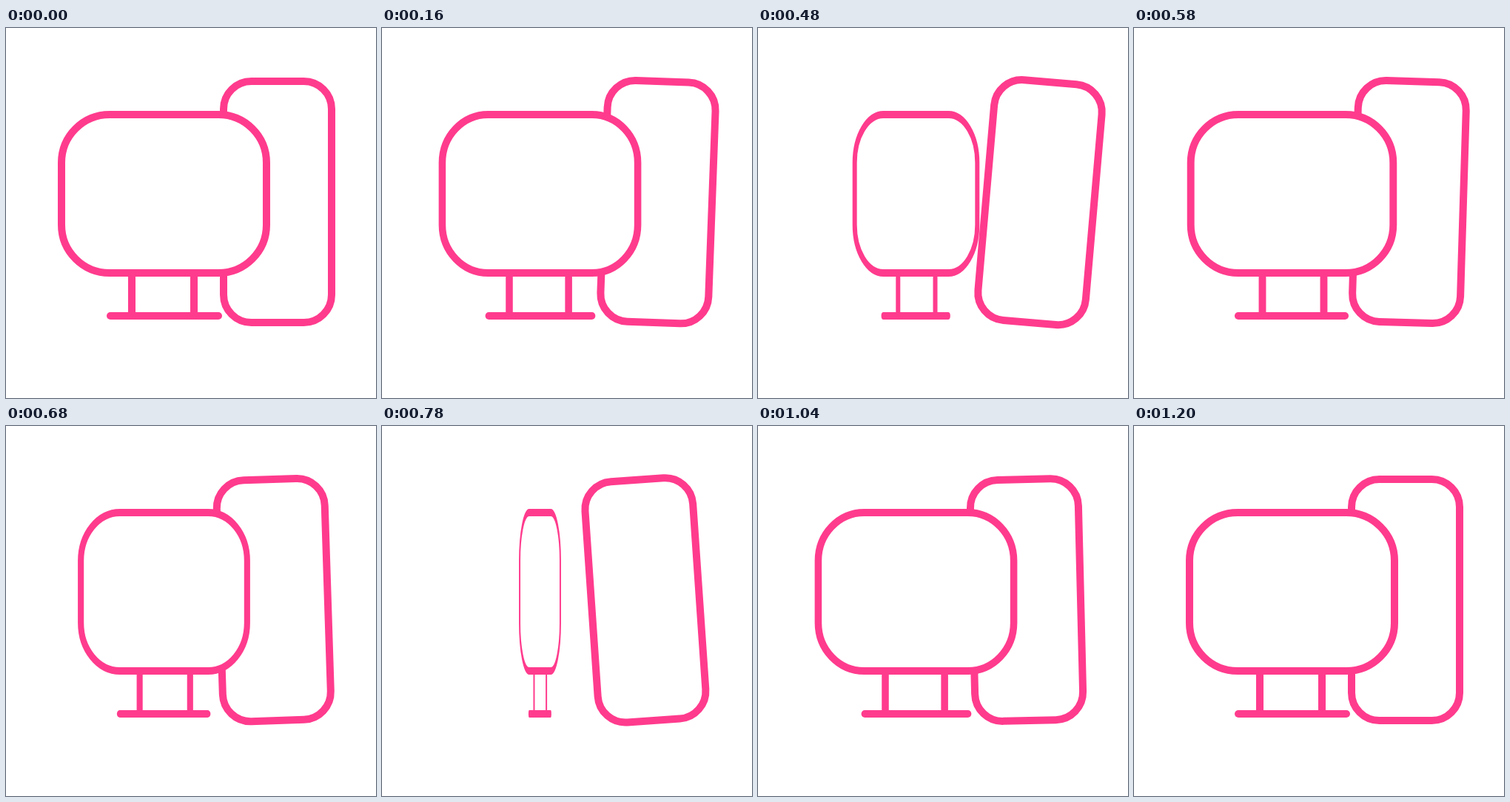
These frames come from a looping animation (500 by 500 pixels, 1500 ms). An HTML page:

```html
<!DOCTYPE html>
<html lang="en">
<head>
<meta charset="utf-8">
<title>Computer</title>
<style>
  html, body { margin: 0; height: 100%; overflow: hidden; background: #fff; }
  svg { display: block; width: 100vw; height: 100vh; }
</style>
</head>
<body>
<svg viewBox="0 0 500 500" fill="#fff" stroke="#ff3b8d" stroke-width="10">
  <rect id="tower" x="294" y="72" width="146" height="326" rx="37.5"/>
  <g id="monitor">
    <path d="M170 331V389M254 331V389"/>
    <path d="M141 389H287" stroke-linecap="round"/>
    <rect x="75" y="117" width="277" height="214" rx="65"/>
  </g>
</svg>
<script>
  const LOOP = 1500, SPIN = 1200, STEP = 20;
  const AXIS = 213.5;
  const swing = [[0, 0], [400, 6], [800, -4], [1200, 0]];
  const tower = document.getElementById('tower');
  const monitor = document.getElementById('monitor');

  const smooth = x => x * x * (3 - 2 * x);

  function swingAngle(t) {
    const i = Math.min(Math.floor(t / 400), swing.length - 2);
    const [t0, a] = swing[i], [t1, b] = swing[i + 1];
    return a + (b - a) * smooth((t - t0) / (t1 - t0));
  }

  function draw() {
    const now = Math.floor(performance.now() % LOOP / STEP) * STEP;
    const t = Math.min(now, SPIN);
    // Flat turn about the vertical axis: only the width changes.
    const width = Math.cos(2 * Math.PI * smooth(t / SPIN));
    monitor.setAttribute('transform', `translate(${AXIS}) scale(${width} 1) translate(${-AXIS})`);
    tower.setAttribute('transform', `rotate(${swingAngle(t)} 367 397)`);
    requestAnimationFrame(draw);
  }
  draw();
</script>
</body>
</html>
```
